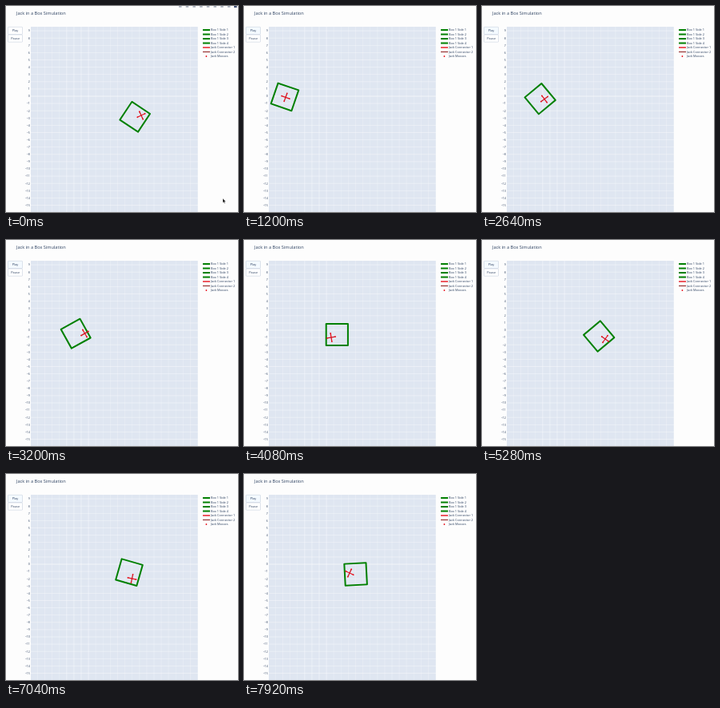
An HTML page for the animation above (8000 ms loop, 290x258 px).

```html
<!DOCTYPE html>
<html lang="en">
<head>
<meta charset="utf-8">
<title>Jack in a Box Simulation</title>
<style>
html, body { margin: 0; width: 100%; height: 100%; overflow: hidden; background: #fdfdfd; }
svg { display: block; width: 100%; height: 100%; }
text { font-family: "Open Sans", Arial, sans-serif; fill: #2a3f5f; }
</style>
</head>
<body>
<svg id="stage" viewBox="0 0 290 258">
  <rect width="290" height="258" fill="#fdfdfd"/>
  <rect x="31" y="26" width="209" height="232" fill="#dfe6f1"/>
  <g id="grid" stroke="#fff"></g>
  <g id="ticks" font-size="3.6" text-anchor="end"></g>
  <text x="13" y="11" font-size="5.6">Jack in a Box Simulation</text>
  <g id="buttons" font-size="3.9" text-anchor="middle"></g>
  <g id="legend" font-size="3.9"></g>
  <g id="toolbar" fill="#a9b0bc"></g>
  <rect id="box" x="-13.6" y="-13.6" width="27.2" height="27.2" fill="none" stroke="#008000" stroke-width="2" stroke-linejoin="round"/>
  <g id="jack" fill="#e8101c" stroke-width="1.25">
    <path d="M-5.2 0H5.2" stroke="#e8101c"/>
    <path d="M0 -5.2V5.2" stroke="#d01420"/>
    <circle cx="-5.2" r=".9"/><circle cx="5.2" r=".9"/>
    <circle cy="-5.2" r=".9"/><circle cy="5.2" r=".9"/>
  </g>
  <path id="cursor" d="M0 0V5.4L1.2 4.3L2.1 6.2L3 5.8L2.1 4H3.7Z" fill="#111" stroke="#fff" stroke-width=".3"/>
</svg>
<script>
const LOOP = 8000, STEP = 80, START = 560, UNIT = 9.1, ZERO_Y = 113;
const $ = id => document.getElementById(id);

function add(parent, tag, attrs, label) {
  const el = document.createElementNS("http://www.w3.org/2000/svg", tag);
  for (const k in attrs) el.setAttribute(k, attrs[k]);
  if (label !== undefined) el.textContent = label;
  $(parent).appendChild(el);
  return el;
}

// Axes
for (let v = 9; v >= -15; v--) {
  const y = ZERO_Y - v * UNIT;
  add("grid", "path", { d: `M31 ${y}H240`, "stroke-width": v ? 0.6 : 0.9, opacity: 0.6 });
  add("ticks", "text", { x: 29.8, y: y + 1.3 }, String(v).replace("-", "−"));
}
for (let i = 0; i < 23; i++) {
  const x = 39.4 + i * UNIT;
  if (x < 240) add("grid", "path", { d: `M${x} 26V258`, "stroke-width": 0.6, opacity: i > 3 && i < 8 ? 0.65 : 0.35 });
}

// Controls
const [play] = ["Play", "Pause"].map((name, i) => {
  const y = 26.3 + i * 9.7;
  const face = add("buttons", "rect", { x: 2.5, y, width: 18, height: 9.2, rx: 0.6, fill: "#fff", stroke: "#bec8d9", "stroke-width": 0.5 });
  add("buttons", "text", { x: 11.6, y: y + 6 }, name);
  return face;
});

// Legend
const entries = [1, 2, 3, 4].map(n => ["Box 1 Side " + n, "#008000", 2]);
entries.push(["Jack Connector 1", "#e8101c", 1.4], ["Jack Connector 2", "#8b1a1a", 1], ["Jack Masses", "#e8101c", 0]);
entries.forEach(([name, color, weight], i) => {
  const y = 30 + i * 5.5;
  if (weight) add("legend", "path", { d: `M246 ${y}H255`, stroke: color, "stroke-width": weight });
  else add("legend", "circle", { cx: 250.4, cy: y, r: 0.9, fill: color });
  add("legend", "text", { x: 256, y: y + 1.4 }, name);
});

// Plot toolbar
for (let i = 0; i < 8; i++) add("toolbar", "rect", { x: 216 + i * 8.7, y: 0, width: 3.6, height: 1.8, rx: 0.6 });
add("toolbar", "rect", { x: 285, y: 0, width: 3.6, height: 2, fill: "#3f4f75" });

// Keys: time, x, y, angle
const boxKeys = [
  [560, 50, 113, 0], [1200, 51, 113.9, 19], [2000, 59, 115, 39], [3200, 87.2, 117.2, 61],
  [4080, 116.3, 118.5, 90], [5280, 146.2, 120.5, 140], [5840, 154, 121.3, 169],
  [6400, 159, 122.2, 227], [7040, 154, 123.2, 286], [7920, 139.6, 125.5, 357]
];
const jackKeys = [
  [560, 50, 113, 0], [2000, 54.5, 116, 45], [3200, 98.5, 117, 60], [4080, 109, 122, 81],
  [5280, 154, 124, 125], [5600, 162, 126, 137], [7040, 157.5, 131, 192], [7920, 132, 124, 205]
];

function sample(keys, t, smooth) {
  let i = 0;
  while (i < keys.length - 2 && t >= keys[i + 1][0]) i++;
  const a = keys[i], b = keys[i + 1], h = b[0] - a[0];
  const u = Math.min(1, (t - a[0]) / h);
  const p = keys[i - 1] || a, n = keys[i + 2] || b;
  return [1, 2, 3].map(c => {
    if (!smooth) return a[c] + (b[c] - a[c]) * u;
    const ma = (b[c] - p[c]) / (b[0] - p[0]) * h;
    const mb = (n[c] - a[c]) / (n[0] - a[0]) * h;
    const v = 1 - u;
    return v * v * (1 + 2 * u) * a[c] + u * v * v * ma + u * u * (3 - 2 * u) * b[c] - u * u * v * mb;
  });
}

function place(id, [x, y, angle]) {
  $(id).setAttribute("transform", `translate(${x} ${y}) rotate(${angle})`);
}

function show(id, on) {
  $(id).setAttribute("visibility", on ? "visible" : "hidden");
}

function draw(time) {
  const t = Math.floor(time % LOOP / STEP) * STEP;
  const running = t >= START;
  place("box", running ? sample(boxKeys, t, true) : [161.2, 138.8, 33.5]);
  place("jack", running ? sample(jackKeys, t, false) : [169, 137, -25]);

  const go = Math.min(1, t / 320);
  place("cursor", [271 - 259 * go, 241 - 209 * go, 0]);
  show("cursor", t < 320);
  show("toolbar", t < 240);
  play.setAttribute("fill", t >= 320 ? "#f4faff" : "#fff");
}

const begin = performance.now();
function tick() {
  draw(performance.now() - begin);
  requestAnimationFrame(tick);
}
tick();
</script>
</body>
</html>
```
